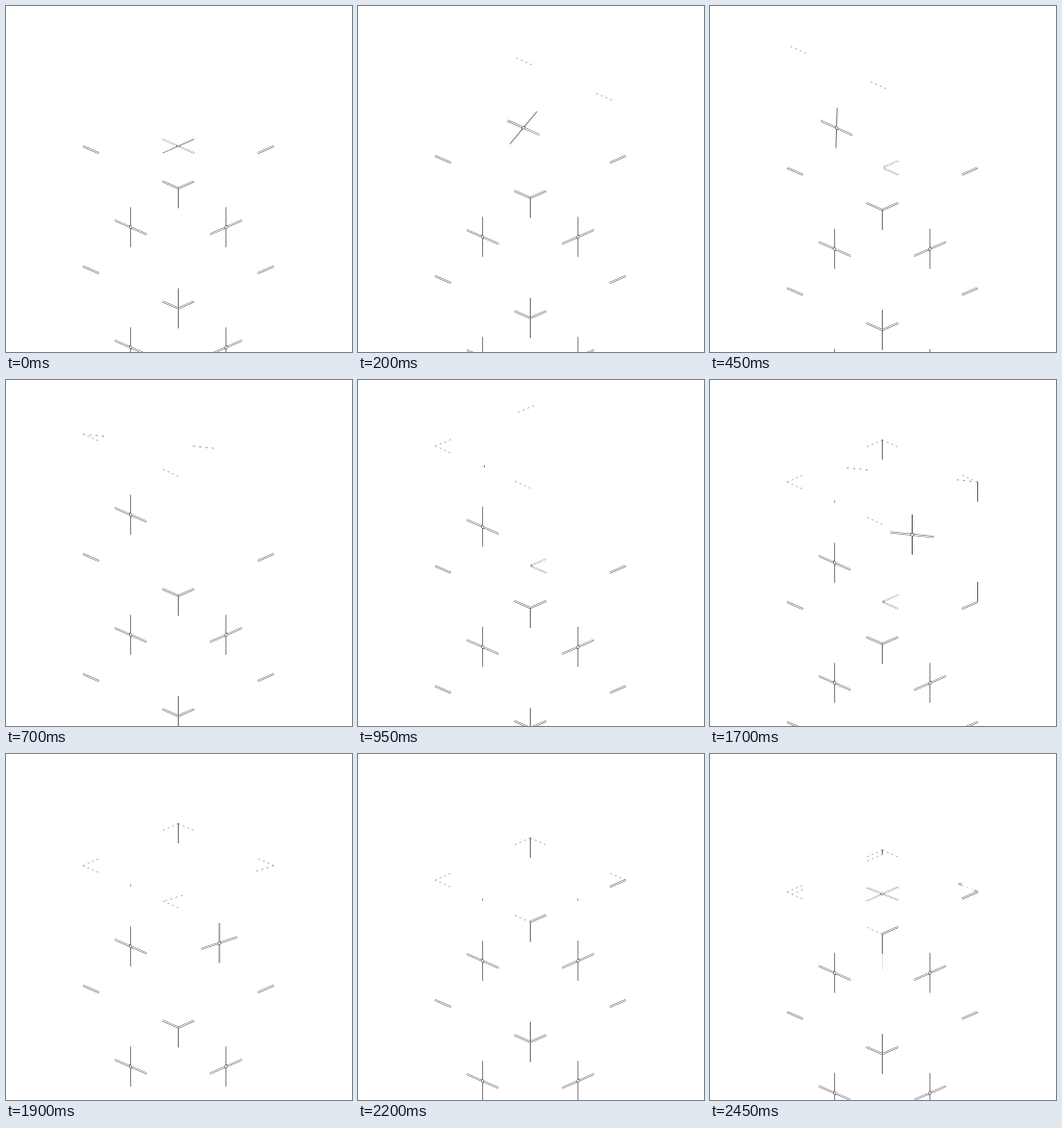
These frames come from a looping animation (360 px wide and 360 px high, 2.5 s). An HTML page with a canvas:

```html
<!DOCTYPE html>
<html lang="en">
<head>
<meta charset="utf-8">
<title>Folding tower</title>
<style>
html, body { margin: 0; width: 100%; height: 100%; overflow: hidden; background: #fff; }
canvas { display: block; width: 360px; height: 360px; }
</style>
</head>
<body>
<canvas id="stage" width="360" height="360"></canvas>
<script>
const ctx = document.getElementById('stage').getContext('2d');
const LOOP = 2500, STEP = 50, FOLD = 500;
const SIZE = 125, HALF = SIZE / 2, TICK = SIZE / 6;
const CENTER = 179.3, WIDE = 99.2, DEEP = 43.8, TOP = 145.8;
const INK = '#606060';

// Axes: x runs left corner to front, y left corner to back, z upwards.
const project = ([x, y, z]) => [(x + y) * WIDE, (x - y) * DEEP - z * SIZE];
const at = (p, level) => {
  const [x, y] = project(p);
  return [CENTER - WIDE + x, level + y];
};

function line(x1, y1, x2, y2, width, color) {
  ctx.strokeStyle = color;
  ctx.lineWidth = width;
  ctx.beginPath();
  ctx.moveTo(x1, y1);
  ctx.lineTo(x2, y2);
  ctx.stroke();
}

function hollow(x1, y1, x2, y2) {
  line(x1, y1, x2, y2, 2, INK);
  line(x1, y1, x2, y2, 1, '#fff');
}

function knot(x, y) {
  for (const [r, color] of [[2, INK], [1.2, '#fff']]) {
    ctx.fillStyle = color;
    ctx.beginPath();
    ctx.arc(x, y, r, 0, 7);
    ctx.fill();
  }
}

function panel(level, origin, u, v, { flat = false, rim = false } = {}) {
  const [ox, oy] = at(origin, level);
  const [ux, uy] = project(u), [vx, vy] = project(v);
  ctx.save();
  ctx.setTransform(ux / SIZE, uy / SIZE, vx / SIZE, vy / SIZE, ox, oy);
  ctx.fillStyle = '#fff';
  ctx.fillRect(0, 0, SIZE, SIZE);
  if (flat) hollow(HALF, HALF - TICK, HALF, HALF + TICK);
  else line(HALF, HALF - TICK, HALF, HALF + TICK, 1.1, INK);
  hollow(HALF - TICK, HALF, HALF + TICK, HALF);
  knot(HALF, HALF);
  if (rim) {
    ctx.setLineDash([2, 4]);
    const y = SIZE - 0.4;
    line(0, y, TICK, y, 0.8, '#888');
    line(SIZE, y, SIZE - TICK, y, 0.8, '#888');
  }
  ctx.restore();
}

// Marks both ends of an edge shared by two panels.
function seam(level, from, to) {
  const a = at(from, level), b = at(to, level);
  const upright = Math.abs(a[0] - b[0]) < 1;
  for (const [p, q] of [[a, b], [b, a]]) {
    const x = p[0] + (q[0] - p[0]) / 6, y = p[1] + (q[1] - p[1]) / 6;
    if (upright) line(p[0], p[1], x, y, 1, INK);
    else hollow(p[0], p[1], x, y);
  }
}

const LEFT = [0, 0, 0], FRONT = [1, 0, 0], BACK = [0, 1, 0], RIGHT = [1, 1, 0];
const UP = [0, 0, 1];
const raise = ([x, y]) => [x, y, 1];

function rimSeams(level) {
  seam(level, LEFT, FRONT);
  seam(level, RIGHT, FRONT);
}

function solidSides(level) {
  const base = level + SIZE;
  panel(base, LEFT, FRONT, UP);
  panel(base, FRONT, BACK, UP);
}

function foldingCube(level, t) {
  const phase = i => Math.min(1, Math.max(0, t / FOLD - i));
  const turn = i => {
    const angle = (1 - Math.cos(Math.PI * phase(i))) * Math.PI / 4;
    return [Math.cos(angle), Math.sin(angle)];
  };
  const rim = { rim: true };

  if (phase(1)) {
    const [c, s] = turn(1);
    panel(level, LEFT, [c, s, 0], UP, rim);
  }
  if (phase(2)) {
    const [c, s] = turn(2);
    panel(level, BACK, [s, -c, 0], UP, rim);
    if (phase(2) === 1) seam(level, BACK, raise(BACK));
  }
  if (phase(4)) {
    const [c, s] = turn(4);
    panel(level, raise(FRONT), BACK, [-s, 0, -c], { flat: true, rim: true });
    if (phase(4) > 0.85) seam(level, raise(BACK).map((n, i) => i ? n : 0.8), raise(RIGHT));
  }
  if (phase(3)) {
    const [c, s] = turn(3);
    panel(level, RIGHT, [-c, -s, 0], UP, rim);
    if (phase(3) < 0.7) seam(level, RIGHT, raise(RIGHT));
  }
  const [c, s] = turn(0);
  panel(level, LEFT, FRONT, [0, c, s], { rim: phase(0) > 0 });
  if (phase(3) === 1) {
    seam(level, FRONT, raise(FRONT));
    seam(level, raise(RIGHT), raise(FRONT));
  }
}

function draw(t) {
  const level = TOP + SIZE * t / LOOP;
  ctx.fillStyle = '#fff';
  ctx.fillRect(0, 0, 360, 360);
  solidSides(level + SIZE);
  solidSides(level);
  panel(level, LEFT, FRONT, BACK, { flat: true });
  foldingCube(level, t);
  for (const y of [level, level + SIZE]) {
    rimSeams(y);
    seam(y + SIZE, FRONT, raise(FRONT));
  }
}

const start = performance.now();
function tick() {
  const t = (performance.now() - start) % LOOP;
  draw(Math.floor(t / STEP) * STEP);
  requestAnimationFrame(tick);
}
tick();
</script>
</body>
</html>
```
